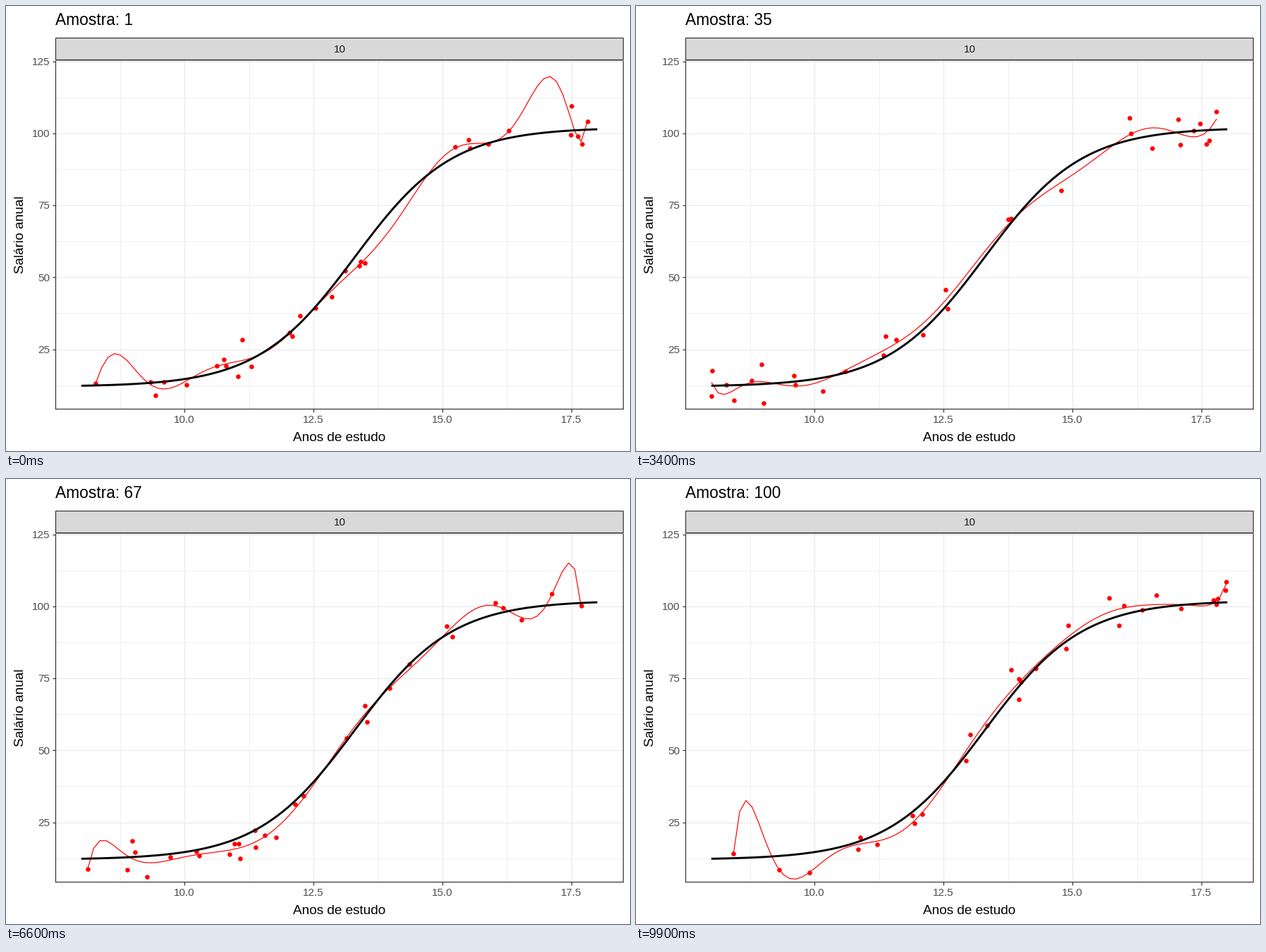
Write a matplotlib script that moves like this. It is 885 by 632 pixels and loops after 10000 ms.

```python
import matplotlib.pyplot as plt
import numpy as np
from matplotlib.animation import FuncAnimation
from matplotlib.patches import Rectangle
from numpy.polynomial import Chebyshev

W, H, DPI = 885, 632, 100
PX = 72 / DPI
LEFT, RIGHT, TOP, BOTTOM = 70.2, 875.2, 76.8, 571.8
X_MIN, X_MAX = 7.5, 18.5
Y_UNIT, Y_25 = 4.09, 487.5  # pixels per salary unit, pixel row of salary 25
SAMPLES, SIZE, DEGREE, NOISE = 100, 30, 12, 4
RED, DARK, GREY = "#ff0000", "#333333", "#4d4d4d"

plt.rcParams["font.family"] = "Liberation Sans"


def truth(x):
    return 12 + 90 / (1 + np.exp(-1.06 * (x - 13.3)))


def sample(n):
    rng = np.random.default_rng(n)
    x = rng.uniform(8, 18, SIZE)
    return x, truth(x) + rng.normal(0, NOISE, SIZE)


def salary(row):
    return 25 + (Y_25 - row) / Y_UNIT


fig = plt.figure(figsize=(W / 100, H / 100), dpi=DPI, facecolor="white")


def label(x, y, text, size, color="black", **kw):
    kw = {"ha": "center", "va": "baseline", **kw}
    return fig.text(x / W, 1 - y / H, text, fontsize=size * PX, color=color, **kw)


def box(top, bottom):
    return LEFT / W, 1 - bottom / H, (RIGHT - LEFT) / W, (bottom - top) / H


# Panel with major and minor grid
ax = fig.add_axes(box(TOP, BOTTOM))
ax.set(xlim=(X_MIN, X_MAX), ylim=(salary(BOTTOM), salary(TOP)))
ax.set_axisbelow(True)
ax.set_xticks(np.arange(10, 18, 2.5))
ax.set_yticks(np.arange(25, 126, 25))
ax.set_xticks(np.arange(8.75, 18, 2.5), minor=True)
ax.set_yticks(np.arange(12.5, 125, 25), minor=True)
ax.grid(which="major", color="#ebebeb", lw=1.3 * PX)
ax.grid(which="minor", color="#ebebeb", lw=0.8 * PX)
ax.tick_params(which="major", length=4.5 * PX, width=1.2 * PX, color=DARK,
               labelbottom=False, labelleft=False)
ax.tick_params(which="minor", length=0)
for side, spine in ax.spines.items():
    spine.set(color="#a0a0a0" if side == "top" else DARK, linewidth=1.2 * PX)

for v in ax.get_xticks():
    x = LEFT + (v - X_MIN) * (RIGHT - LEFT) / (X_MAX - X_MIN)
    label(x, 592.5, f"{v:.1f}", 15.2, GREY)
for v in ax.get_yticks():
    label(62, Y_25 + 5.5 - (v - 25) * Y_UNIT, f"{v:.0f}", 15.2, GREY, ha="right")

# Strip, axis titles and heading
x, y, w, h = box(44.8, 75.8)
fig.add_artist(Rectangle((x, y), w, h, fc="#d9d9d9", ec=DARK, lw=1.2 * PX))
label(473, 66.5, "10", 15.2, "#1a1a1a")
label(473, 617.5, "Anos de estudo", 19)
label(25, 324.5, "Salário anual", 19, rotation=90, rotation_mode="anchor")
title = label(70.5, 27, "", 22.7, ha="left")

dots, = ax.plot([], [], "o", color=RED, ms=6.6 * PX, mew=0)
fitted, = ax.plot([], [], color=RED, lw=1.2 * PX)
grid = np.linspace(8, 18, 101)
ax.plot(grid, truth(grid), color="black", lw=2.9 * PX, solid_capstyle="butt")


def draw(i):
    x, y = sample(i + 1)
    xs = np.linspace(x.min(), x.max(), 80)
    dots.set_data(x, y)
    fitted.set_data(xs, Chebyshev.fit(x, y, DEGREE)(xs))
    title.set_text(f"Amostra: {i + 1}")
    return dots, fitted, title


anim = FuncAnimation(fig, draw, frames=SAMPLES, interval=100, repeat=True, repeat_delay=0)
plt.show()
```
